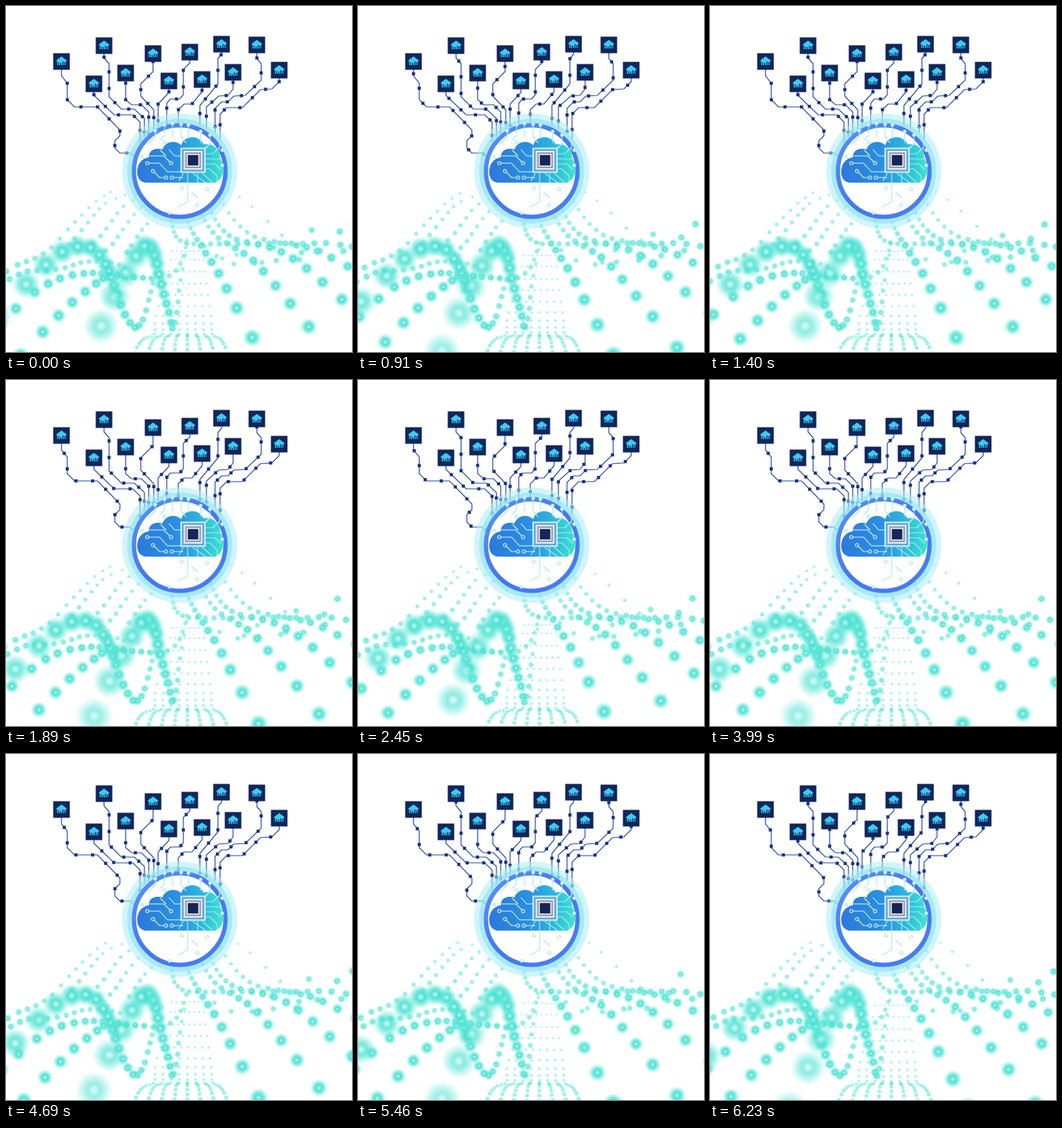
Write an HTML page with a canvas that moves like this. It is 480 px wide and 480 px high and loops after 6300 ms.

```html
<!DOCTYPE html>
<html lang="en">
<head>
<meta charset="utf-8">
<title>Cloud network</title>
<style>
  html, body { margin: 0; width: 100%; height: 100%; overflow: hidden; background: #fff; }
  canvas, svg { position: absolute; left: 0; top: 0; width: 480px; height: 480px; }
</style>
</head>
<body>
<canvas id="stage" width="480" height="480"></canvas>
<svg viewBox="0 0 480 480">
  <defs>
    <linearGradient id="sky">
      <stop offset="0" stop-color="#2d78dc"/>
      <stop offset=".45" stop-color="#2a8fe0"/>
      <stop offset=".75" stop-color="#2bb9dc"/>
      <stop offset="1" stop-color="#3fe6cc"/>
    </linearGradient>
    <linearGradient id="rim" x2="1" y2="1">
      <stop offset="0" stop-color="#5b93f6"/>
      <stop offset=".5" stop-color="#4377ef"/>
      <stop offset="1" stop-color="#4a7ff3"/>
    </linearGradient>
    <g id="bank">
      <rect x="-11.5" y="-11.5" width="23" height="23" fill="#10265b"/>
      <path d="M-8-1 0-7 8-1 6-.5V5H-6V-.5Z" fill="#3ccbf2"/>
      <path d="M-4 5V1M-1 5V2M2 5V0M4.500 5V1" stroke="#10265b" stroke-width="1.300"/>
    </g>
  </defs>

  <circle cx="241" cy="229" r="80" fill="#a9edf8" opacity=".55"/>
  <circle cx="241" cy="229" r="73" fill="#8fe2f6" opacity=".6"/>
  <circle cx="241" cy="229" r="63.500" fill="#fff" stroke="url(#rim)" stroke-width="6"/>

  <path fill="url(#sky)" d="M195 245C186 245 182 238 182 230C182 219 189 211 198 210C198 200 207 196 217 199C221 188 234 185 243 193C247 179 268 178 274 192C286 189 298 199 297 212C304 219 304 240 290 245Z"/>

  <g fill="none" stroke="#a9eaf6" stroke-width="1.200">
    <path d="M207 175V182L198 191M220 167V180L213 187M231 165V183M243 166V182L250 190M253 167V184M270 176V190M283 181V190L276 198M296 190V200"/>
    <path d="M252 245V272L238 279M257 258 266 266M276 199 284 190M277 205H287L296 196M277 212H299M277 219H290L298 227M277 226H283L293 236V244M272 232 286 244M266 232V245M259 232 277 245M252 232V245M246 232 240 243"/>
    <g fill="#fff">
      <circle cx="207" cy="173" r="2"/><circle cx="220" cy="165" r="2"/>
      <circle cx="231" cy="163" r="2"/><circle cx="243" cy="164" r="2"/>
      <circle cx="253" cy="165" r="2"/><circle cx="270" cy="174" r="2"/>
      <circle cx="283" cy="179" r="2"/><circle cx="220" cy="189" r="2"/>
      <circle cx="189" cy="209" r="2"/><circle cx="300" cy="200" r="2"/>
      <circle cx="300" cy="221" r="2"/><circle cx="244" cy="252" r="2"/>
      <circle cx="279" cy="254" r="2"/><circle cx="265" cy="276" r="2"/>
      <circle cx="227" cy="287" r="2"/>
    </g>
  </g>
  <g fill="none" stroke="#d9f5fc" stroke-width="1.100">
    <path d="M193 208H219L227 216M198 218H213L224 230H242M206 231 213 238H220M232 238H246M226 199 234 208H242M214 200 222 208"/>
    <g fill="#2b83de">
      <circle cx="196" cy="218" r="2.200"/><circle cx="229" cy="218" r="2.200"/>
      <circle cx="204" cy="229" r="2.200"/><circle cx="222" cy="238" r="2.200"/>
      <circle cx="230" cy="238" r="2.200"/>
    </g>
  </g>

  <rect x="243" y="197.500" width="33" height="33" fill="#5fa9d8" stroke="#d3eef6" stroke-width="2"/>
  <rect x="247.500" y="202" width="24" height="24" fill="#9c9ca8" stroke="#e8eef2" stroke-width="2"/>
  <rect x="251.500" y="206" width="16" height="16" fill="#13265c" stroke="#f4f4f2" stroke-width="1.500"/>
  <g id="banks"></g>
</svg>
<script>
const STEP = 70, LOOP = 6300, PITCH = 23;
const ctx = document.getElementById('stage').getContext('2d');

// Each wire begins under its icon; "shift" offsets its moving squares.
const wires = [];
function wire(x, y, shift, path) {
  const nums = path.split(' ').map(Number), pts = [];
  for (let i = 0; i < nums.length; i += 2) pts.push([nums[i], nums[i + 1]]);
  wires.push({ x, y, shift, pts: [[x, y + 11], ...pts] });
}
wire(77, 77, -1, '77 97 85 107 85 130 95 140 127 140 158 172 158 180 151 187 151 197 158 204 172 204 180 210');
wire(136, 55, 5, '136 72 143 80 143 126 160 143 178 143 192 156 192 182');
wire(122, 108, 4, '122 124 150 151 176 151 186 161 186 190');
wire(166, 93, 3, '166 130 174 137 188 137 198 147 198 180');
wire(204, 66, 0, '204 91 187 108 187 125 205 144 205 172');
wire(226, 104, 4, '226 120 211 136 211 168');
wire(255, 64, -5, '255 79 246 88 246 123 241 129 228 129 223 135 223 165');
wire(272, 102, 4, '272 119 258 136 247 136 239 144 239 165');
wire(299, 53, 4, '299 67 294 73 294 108 269 138 269 168');
wire(315, 92, 3, '315 115 308 124 295 125 278 140 278 172');
wire(348, 54, 7, '348 73 354 80 354 103 332 124 316 125 308 133 299 133 290 142 290 176');
wire(379, 89, 5, '379 105 369 115 353 116 328 141 306 141 297 150 297 186');

document.getElementById('banks').innerHTML =
  wires.map(w => `<use href="#bank" x="${w.x}" y="${w.y}"/>`).join('');

// Streams run from far to near; "gap" dots lie between neighbouring points.
const FAST = 1 / 5, SLOW = 8 / 30, WIDE = 4 / 30;
const streams = [];
function stream(rate, gap, r0, r1, path) {
  const nums = path.split(' ').map(Number), pts = [];
  for (let i = 0; i < nums.length; i += 2) pts.push([nums[i], nums[i + 1]]);
  streams.push({ rate, gap, r0, r1, pts });
}

// Pale lines under the disc, left
stream(SLOW, 2, 2.5, 6.5, '145 258 125 271 105 290 86 310 63 335 40 350 16 359 -12 376');
stream(FAST, 2, 2.5, 5, '165 262 138 274 122 290 105 311 88 331');
stream(FAST, 2, 3, 5, '188 264 163 278 147 298 131 319 112 337');
stream(FAST, 2, 3, 5, '195 273 178 289 162 310 148 330 130 346');
stream(FAST, 2, 3, 5, '215 285 196 302 182 320 168 342');

// Rows and runs, left
stream(SLOW, 2, 4, 6.5, '165 362 146 356 126 354 104 356 82 363 56 367 30 368 5 379 -25 395');
stream(SLOW, 2, 4, 11, '200 377 178 377 155 374 132 371 108 371 75 378 40 397 -8 440');
stream(SLOW, 2, 3.5, 13, '251 325 246 347 236 367 215 379 190 377 165 375 143 374 125 385 92 411 51 452 -5 512');

// Large waves
stream(FAST, 2, 4, 24, '211 360 204 385 198 408 190 435 179 446 165 428 154 400 146 376 138 358 117 335 78 341 28 386 -50 466');
stream(FAST, 2, 3, 31, '252 330 245 365 240 395 237 425 231 447 226 425 219 400 212 372 206 345 192 333 166 371 132 444 82 560');

// Fan below the disc
for (let i = 0; i < 8; i++) {
  const s = i - 3.5, drop = Math.abs(s);
  const fan = [[252, 6, 340], [250, 8, 385], [246, 11, 430], [246, 11.5, 455], [244, 15, 458 + drop], [243, 17.5, 477 - drop], [243, 20, 500]];
  stream(FAST, 3, 1.8, 4.5, fan.map(([c, k, y]) => `${c + s * k} ${y}`).join(' '));
}

// Right side
stream(FAST, 2, 4, 6.5, '228 290 231 306 236 320 250 329 272 330 296 330 322 330 350 330 380 329 412 330 444 329 480 334');
stream(FAST, 2, 3.5, 15, '250 294 256 308 265 324 277 343 295 371 320 419 360 495');
stream(FAST, 2, 3.5, 15, '272 290 281 306 295 322 318 336 343 353 374 388 420 445 494 540');
stream(FAST, 2, 3.5, 13, '283 280 290 296 302 312 320 324 350 331 382 341 417 364 466 407 540 470');
stream(FAST, 2, 3, 10, '296 266 309 287 325 306 345 320 372 327 403 332 432 340 474 361 530 390');
stream(SLOW, 1, 2, 4, '310 255 324 265 341 278 363 299 383 318 402 332');
stream(SLOW, 1, 4, 6, '276 333 292 347 316 358 345 357 375 353 407 352 436 340 468 340');
stream(WIDE, 1, 4, 7.5, '300 350 355 356 410 342 463 313 520 285');
stream(WIDE, 1, 4, 8, '320 345 372 335 424 311 485 301 550 300');

// Soft dot, drawn once and scaled
const dot = document.createElement('canvas');
dot.width = dot.height = 64;
{
  const c = dot.getContext('2d');
  const g = c.createRadialGradient(32, 32, 0, 32, 32, 32);
  g.addColorStop(0, 'rgba(190,248,242,1)');
  g.addColorStop(.14, 'rgba(145,240,230,1)');
  g.addColorStop(.32, 'rgba(72,224,209,1)');
  g.addColorStop(.55, 'rgba(84,227,213,.75)');
  g.addColorStop(.8, 'rgba(110,233,221,.35)');
  g.addColorStop(1, 'rgba(130,238,228,0)');
  c.fillStyle = g;
  c.fillRect(0, 0, 64, 64);
}

function spline(pts, u) {
  const i = Math.min(Math.floor(u), pts.length - 2), f = u - i;
  const at = k => pts[Math.max(0, Math.min(pts.length - 1, k))];
  const [a, b, c, d] = [at(i - 1), at(i), at(i + 1), at(i + 2)];
  return [0, 1].map(k => b[k] + f / 2 * (c[k] - a[k]
    + f * (2 * a[k] - 5 * b[k] + 4 * c[k] - d[k]
    + f * (3 * (b[k] - c[k]) + d[k] - a[k]))));
}

function drawStream(s, step) {
  const end = s.pts.length - 1;
  for (let n = s.rate * step % 1; n <= end * s.gap; n++) {
    const u = n / s.gap;
    const [x, y] = spline(s.pts, u);
    const r = s.r0 * Math.pow(s.r1 / s.r0, u / end);
    ctx.globalAlpha = r > 18 ? Math.max(.5, .9 - (r - 18) * .04) : Math.min(.95, .3 + r * .09);
    ctx.drawImage(dot, x - r, y - r, 2 * r, 2 * r);
  }
  ctx.globalAlpha = 1;
}

function drawWire(w, step) {
  ctx.beginPath();
  w.pts.forEach(p => ctx.lineTo(...p));
  ctx.stroke();
  let next = (w.shift + step * PITCH / 10 + PITCH) % PITCH;
  for (let i = 1; i < w.pts.length; i++) {
    const [ax, ay] = w.pts[i - 1], [bx, by] = w.pts[i];
    const len = Math.hypot(bx - ax, by - ay);
    for (; next < len; next += PITCH) {
      const f = next / len;
      ctx.fillRect(ax + (bx - ax) * f - 2.2, ay + (by - ay) * f - 2.2, 4.4, 4.4);
    }
    next -= len;
  }
}

function draw() {
  const step = Math.floor(performance.now() % LOOP / STEP);
  ctx.clearRect(0, 0, 480, 480);
  streams.forEach(s => drawStream(s, step));
  ctx.strokeStyle = '#27459a';
  ctx.fillStyle = '#17348a';
  ctx.lineWidth = 1.2;
  wires.forEach(w => drawWire(w, step));
  requestAnimationFrame(draw);
}
draw();
</script>
</body>
</html>
```
